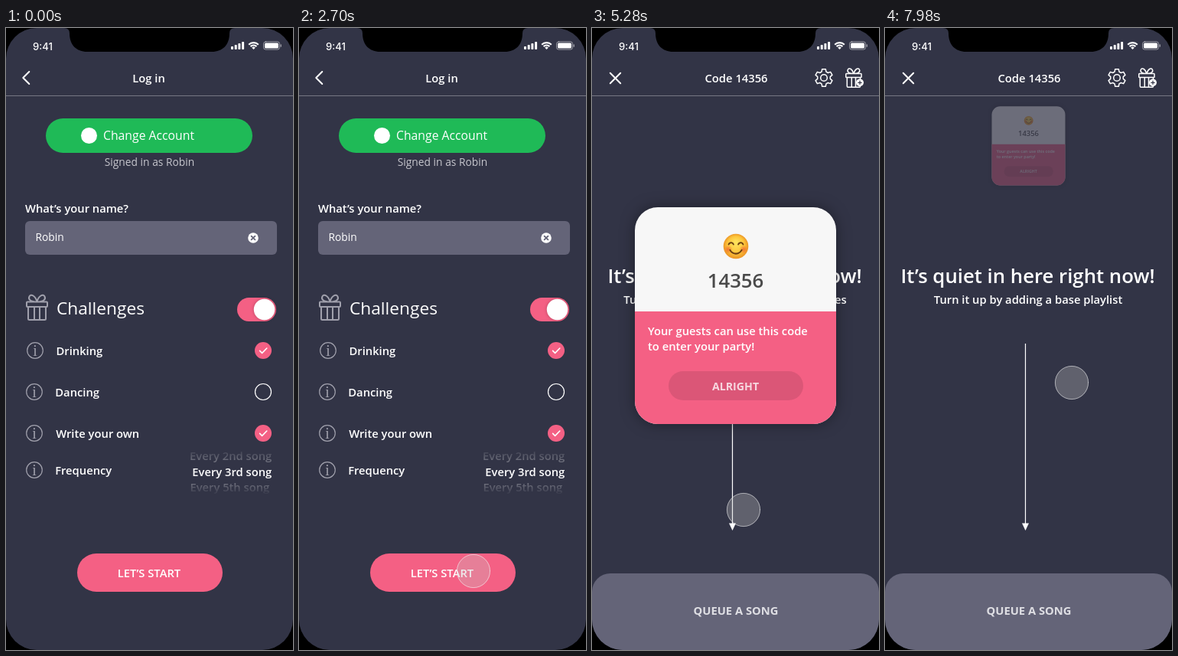
An HTML page with a canvas for the animation above (8 s loop, 375 by 812 pixels).

```html
<!DOCTYPE html>
<html lang="en">
<head>
<meta charset="utf-8">
<title>Party app</title>
<style>
  html, body { margin: 0; width: 100%; height: 100%; overflow: hidden; background: #000; }
  canvas { display: block; width: 375px; height: 812px; }
</style>
</head>
<body>
<canvas id="stage"></canvas>
<script>
const W = 375, H = 812, LOOP = 8000;
const BG = '#323446', PINK = '#f46084', PANEL = '#646478', WHITE = '#fff', MUTED = '#a0a0ac';
const SANS = '"Open Sans", sans-serif', BODY = 14.75;
const OPEN_AT = 3440, CLOSE_AT = 7480, CARD_MS = 1200;

const dpr = window.devicePixelRatio || 1;
const stage = document.getElementById('stage');
const layer = document.createElement('canvas');
for (const c of [stage, layer]) { c.width = W * dpr; c.height = H * dpr; }
const main = stage.getContext('2d'), over = layer.getContext('2d');
let g = main;

// Pointer path: time, x, y
const PATH = [
  [425, 319, -24], [1000, 267, 505],
  [1270, 267, 505], [1700, 197, 738],
  [1820, 197, 738], [2090, 203, 730], [2700, 228, 709],
  [4990, 228, 709], [5280, 198, 629], [5520, 189, 573], [5800, 200, 530], [6080, 203, 459],
  [6350, 203, 459], [6740, 244, 463]
];

// Monotone cubic through the path keys
function slope(i, d) {
  if (i <= 0 || i >= PATH.length - 1) return 0;
  const rate = j => (PATH[j + 1][d] - PATH[j][d]) / (PATH[j + 1][0] - PATH[j][0]);
  const a = rate(i - 1), b = rate(i);
  return a * b <= 0 ? 0 : 2 * a * b / (a + b);
}

function pointer(t) {
  const n = PATH.length;
  if (t >= PATH[n - 1][0]) return PATH[n - 1].slice(1);
  let i = 0;
  while (t >= PATH[i + 1][0]) i++;
  const h = PATH[i + 1][0] - PATH[i][0], u = (t - PATH[i][0]) / h;
  return [1, 2].map(d => {
    const a = PATH[i][d], b = PATH[i + 1][d];
    return a + (b - a) * u * u * (3 - 2 * u)
      + h * u * (1 - u) * ((1 - u) * slope(i, d) - u * slope(i + 1, d));
  });
}

// cubic-bezier(.25, .1, .25, 1)
function ease(x) {
  if (x <= 0) return 0;
  if (x >= 1) return 1;
  const bez = (a, b, u) => 3 * (1 - u) * (1 - u) * u * a + 3 * (1 - u) * u * u * b + u * u * u;
  let lo = 0, hi = 1;
  for (let i = 0; i < 30; i++) {
    const mid = (lo + hi) / 2;
    if (bez(.25, .25, mid) < x) lo = mid; else hi = mid;
  }
  return bez(.1, 1, lo);
}

function text(str, x, y, size, { weight = 600, align = 'left', color = WHITE, family = SANS } = {}) {
  g.font = `${weight} ${size}px ${family}`;
  g.textAlign = align;
  g.fillStyle = color;
  g.fillText(str, x, y);
}

function box(x, y, w, h, r, color) {
  g.beginPath();
  g.roundRect(x, y, w, h, r);
  g.fillStyle = color;
  g.fill();
}

function disc(x, y, r, color) {
  g.beginPath();
  g.arc(x, y, r, 0, 7);
  g.fillStyle = color;
  g.fill();
}

function ring(x, y, r, color, width) {
  g.beginPath();
  g.arc(x, y, r, 0, 7);
  pen(color, width);
}

function pen(color, width) {
  g.strokeStyle = color;
  g.lineWidth = width;
  g.stroke();
}

function line(color, width, ...pts) {
  g.beginPath();
  pts.forEach(p => g.lineTo(...p));
  pen(color, width);
}

function cross(x, y, r, color, width) {
  line(color, width, [x - r, y - r], [x + r, y + r]);
  line(color, width, [x - r, y + r], [x + r, y - r]);
}

function gift(x, y, k, color, width) {
  g.save();
  g.translate(x, y);
  g.scale(k, k);
  g.beginPath();
  g.roundRect(1, 10, 27, 6.5, 1);
  g.roundRect(3, 16.5, 23, 17, 1.5);
  for (const rx of [11, 18]) { g.moveTo(rx, 17); g.lineTo(rx, 33); }
  for (const s of [-1, 1]) {
    g.moveTo(14.5, 10);
    g.bezierCurveTo(14.5 + s * 2, 2, 14.5 + s * 8, -1, 14.5 + s * 10, 3);
    g.bezierCurveTo(14.5 + s * 12, 7, 14.5 + s * 8, 10, 14.5, 10);
  }
  pen(color, width / k);
  g.restore();
}

function gear(x, y) {
  g.beginPath();
  for (let i = 0; i < 6; i++) {
    const a = i * Math.PI / 3;
    for (const [da, r] of [[-.36, 8.4], [-.2, 11.5], [.2, 11.5], [.36, 8.4]])
      g.lineTo(x + r * Math.sin(a + da), y - r * Math.cos(a + da));
  }
  g.closePath();
  pen(WHITE, 1.5);
  ring(x, y, 4.3, WHITE, 1.5);
}

function statusBar() {
  g.beginPath();
  g.moveTo(76, 0);
  g.quadraticCurveTo(83, 0, 83, 7);
  g.bezierCurveTo(83, 22, 92, 31, 106, 31);
  g.lineTo(269, 31);
  g.bezierCurveTo(283, 31, 292, 22, 292, 7);
  g.quadraticCurveTo(292, 0, 299, 0);
  g.fillStyle = '#000';
  g.fill();

  text('9:41', 48, 29, 13.1, { weight: 500, align: 'center', family: 'Inter, sans-serif' });
  for (let i = 0; i < 4; i++) {
    const h = 4 + i * 2;
    box(294 + i * 4.7, 28 - h, 3, h, .8, WHITE);
  }
  g.lineCap = 'butt';
  for (const [r, w] of [[8.9, 2.2], [5.5, 2.2], [1.6, 3.2]]) {
    g.beginPath();
    g.arc(323.5, 28, r, -Math.PI * .75, -Math.PI * .25);
    pen(WHITE, w);
  }
  g.lineCap = 'round';
  g.beginPath();
  g.roundRect(336.5, 17.9, 21, 10.2, 2.8);
  pen('rgba(255,255,255,.5)', 1);
  box(338, 19.4, 18, 7.2, 1.5, WHITE);
  box(358.6, 21.2, 1.2, 3.6, .6, 'rgba(255,255,255,.6)');
}

function header(title, x) {
  text(title, x, 70.5, BODY, { align: 'center' });
  g.fillStyle = 'rgba(255,255,255,.33)';
  g.fillRect(0, 88, W, 1);
}

function info(x, y) {
  ring(x, y, 10.3, MUTED, 1.2);
  text('i', x, y + 6.5, 20, { weight: 400, align: 'center', color: MUTED, family: '"Liberation Serif", serif' });
}

function check(y) {
  disc(336, y, 11, PINK);
  line(WHITE, 1.6, [331.6, y + .4], [334.6, y + 3.4], [340.8, y - 3]);
}

function shade(y, h, from, to) {
  const fade = g.createLinearGradient(0, y, 0, y + h);
  fade.addColorStop(0, `rgba(50,52,70,${from})`);
  fade.addColorStop(1, `rgba(50,52,70,${to})`);
  g.fillStyle = fade;
  g.fillRect(230, y, 125, h);
}

function loginScreen() {
  header('Log in', 186.5);
  line(WHITE, 2, [30.3, 57], [22.3, 65], [30.3, 73]);

  box(52, 118, 270, 45, 22.5, '#1fba57');
  disc(108.5, 140.5, 10.5, WHITE);
  text('Change Account', 127, 146, 15.75, { weight: 400 });
  text('Signed in as Robin', 187.5, 180, 13.8, { weight: 400, align: 'center', color: '#c6c6cd' });

  text('What’s your name?', 25, 241, BODY);
  box(25, 252, 329, 44, 6, PANEL);
  text('Robin', 38.5, 278, 13.8, { weight: 400 });
  disc(323, 274, 6.8, WHITE);
  cross(323, 274, 2.4, PANEL, 1.8);

  gift(26, 347.5, 1, MUTED, 2);
  text('Challenges', 66, 374, 22.7, { weight: 400 });
  box(302, 352, 51, 31, 15.5, PINK);
  g.save();
  g.shadowColor = 'rgba(0,0,0,.25)';
  g.shadowBlur = 4 * dpr;
  disc(337.5, 367.5, 13.7, WHITE);
  g.restore();

  info(38, 421);
  text('Drinking', 65.5, 427, BODY);
  check(421);
  info(37, 475);
  text('Dancing', 64.3, 481, BODY);
  ring(336, 475, 10.5, WHITE, 1.2);
  info(37, 529);
  text('Write your own', 65.2, 535, BODY);
  check(529);
  info(37, 577);
  text('Frequency', 64.2, 583, BODY);

  const dim = { align: 'right', color: 'rgba(255,255,255,.34)' };
  text('Every 2nd song', 347.3, 563.5, BODY, dim);
  text('Every 5th song', 344.3, 605, BODY, dim);
  shade(548, 20, 1, 0);
  shade(592, 18, 0, 1);
  text('Every 3rd song', 347.3, 585, BODY, { align: 'right' });

  box(93, 686, 190, 50, 25, PINK);
  text('LET’S START', 187, 716.5, BODY, { align: 'center' });
}

function queueScreen(sub) {
  header('Code 14356', 188.5);
  cross(30.5, 65.5, 6.7, WHITE, 2);
  gear(303, 65);
  gift(331, 52, .75, WHITE, 1.5);
  disc(350, 71.3, 4.9, WHITE);
  line(BG, 1.2, [347.8, 71.3], [352.2, 71.3]);
  line(BG, 1.2, [350, 69.1], [350, 73.5]);

  text('It’s quiet in here right now!', 186.5, 333, 25.75, { align: 'center' });
  text(sub, 187, 360, BODY, { align: 'center' });

  g.lineCap = 'butt';
  line(WHITE, 1.2, [183.5, 412], [183.5, 648]);
  g.lineCap = 'round';
  g.beginPath();
  g.moveTo(179, 646.5);
  g.lineTo(188, 646.5);
  g.lineTo(183.5, 656);
  g.fillStyle = WHITE;
  g.fill();

  box(0, 712, W, 120, 24, PANEL);
  text('QUEUE A SONG', 188, 766, BODY, { weight: 700, align: 'center', color: '#dedee3' });
}

function smiley(x, y) {
  const skin = g.createRadialGradient(x, y - 5, 2, x, y, 17);
  skin.addColorStop(0, '#ffe15a');
  skin.addColorStop(.6, '#fdc53c');
  skin.addColorStop(1, '#e98f22');
  disc(x, y, 16.3, skin);
  for (const s of [-1, 1]) {
    const cheek = g.createRadialGradient(x + s * 10, y + 4, 0, x + s * 10, y + 4, 5.5);
    cheek.addColorStop(0, 'rgba(240,90,50,.75)');
    cheek.addColorStop(1, 'rgba(240,90,50,0)');
    disc(x + s * 10, y + 4, 5.5, cheek);
    g.beginPath();
    g.arc(x + s * 6.3, y - 1.5, 3.3, Math.PI * 1.1, Math.PI * 1.9);
    pen('#6b3f12', 2);
  }
  g.beginPath();
  g.arc(x, y + 1, 8.6, Math.PI * .15, Math.PI * .85);
  pen('#6b3f12', 2);
}

// Drawn on its own layer so that it fades as one piece
function card(p) {
  if (p <= 0) return;
  const s = .1 + .9 * p;
  g = over;
  g.setTransform(dpr, 0, 0, dpr, 0, 0);
  g.clearRect(0, 0, W, H);
  g.lineCap = g.lineJoin = 'round';
  g.translate(187.5, 375.5 - 349 * (1 - s));
  g.scale(s, s);
  g.translate(-187.5, -375.5);

  g.save();
  g.shadowColor = 'rgba(0,0,0,.38)';
  g.shadowBlur = 18 * s * dpr;
  box(56, 234, 263, 283, 30, '#f7f7f7');
  g.restore();
  box(56, 370, 263, 147, [0, 0, 30, 30], PINK);
  smiley(188, 285);
  text('14356', 187.5, 339, 25.75, { align: 'center', color: '#4a4a4a' });
  text('Your guests can use this code', 73, 401, BODY);
  text('to enter your party!', 73, 421, BODY);
  box(100, 448, 176, 38, 19, 'rgba(0,0,0,.1)');
  text('ALRIGHT', 187.5, 472.5, 14.2, { weight: 700, align: 'center', color: 'rgba(255,255,255,.76)' });

  g = main;
  g.globalAlpha = p;
  g.drawImage(layer, 0, 0, W, H);
  g.globalAlpha = 1;
}

function draw(t) {
  g = main;
  g.setTransform(dpr, 0, 0, dpr, 0, 0);
  g.fillStyle = '#000';
  g.fillRect(0, 0, W, H);
  g.lineCap = g.lineJoin = 'round';

  g.save();
  g.beginPath();
  g.roundRect(0, 0, W, H, 40);
  g.clip();
  g.fillStyle = BG;
  g.fillRect(0, 0, W, H);
  if (t < OPEN_AT) {
    loginScreen();
  } else {
    queueScreen(t < CLOSE_AT ? 'Turn it up by queuing your favorite tunes' : 'Turn it up by adding a base playlist');
    card(ease((t - OPEN_AT) / CARD_MS) - ease((t - CLOSE_AT) / CARD_MS));
  }
  g.restore();
  statusBar();

  if (t >= PATH[0][0]) {
    const [x, y] = pointer(t);
    disc(x, y, 22, 'rgba(198,198,198,.31)');
    ring(x, y, 21.6, 'rgba(255,255,255,.5)', 1);
  }
}

let start;
function tick(now) {
  start ??= now;
  draw((now - start) % LOOP);
  requestAnimationFrame(tick);
}
draw(0);
requestAnimationFrame(tick);
</script>
</body>
</html>
```
